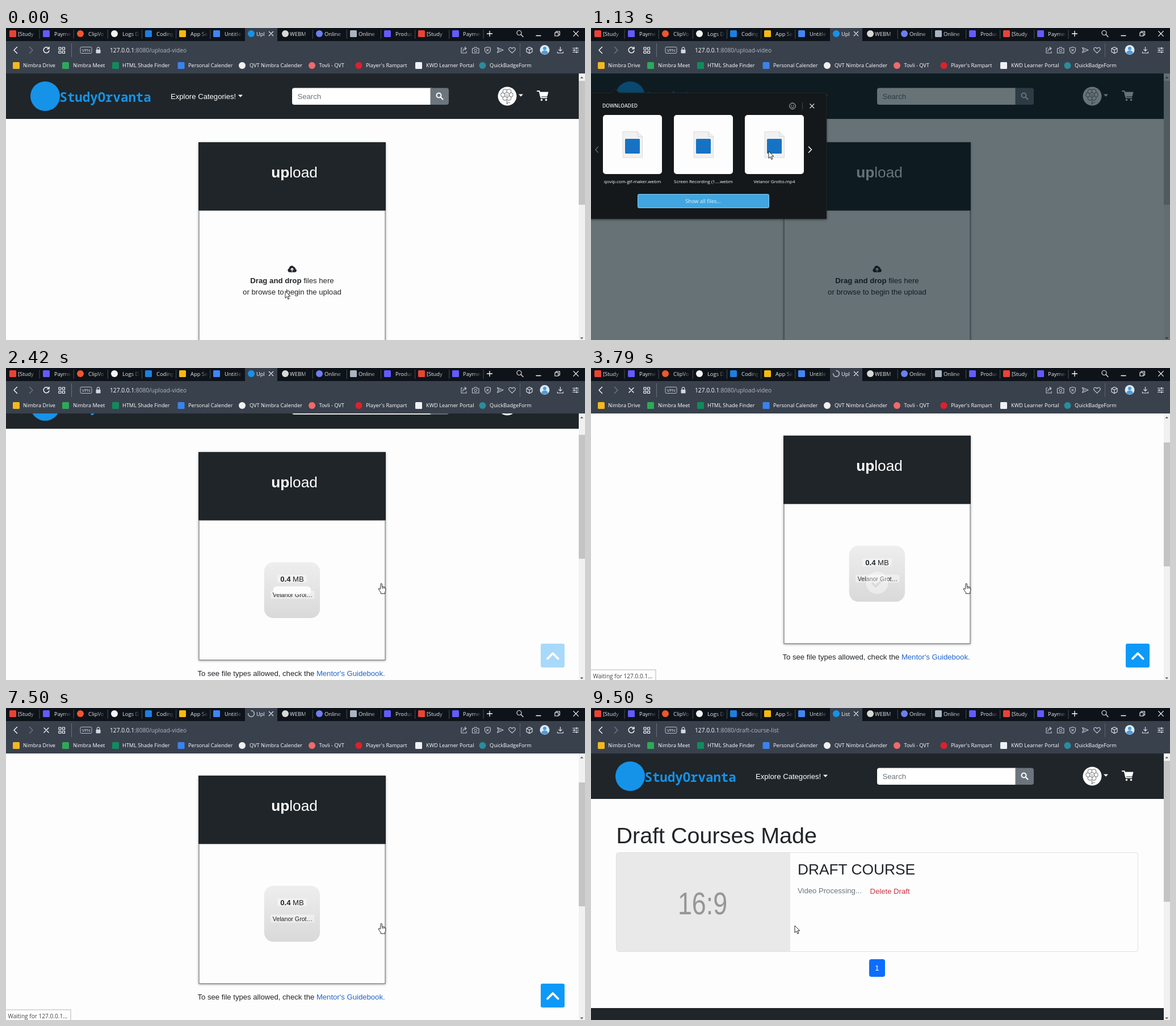
Recreate the animation shown at these times as an HTML page. Size 1020 by 549 pixels, loop 9540 ms.

```html
<!DOCTYPE html>
<html lang="en">
<head>
<meta charset="utf-8">
<title>Video upload</title>
<style>
html, body { margin: 0; width: 100%; height: 100%; overflow: hidden; background: #fdfdfd; }
svg { display: block; width: 100%; height: 100%; }
.ui { font-family: "Open Sans", "Noto Sans", sans-serif; }
.web { font-family: "Liberation Sans", Arial, sans-serif; }
.mono { font-family: "Noto Sans Mono", "DejaVu Sans Mono", monospace; }
text { white-space: pre; }
</style>
</head>
<body>
<svg id="stage" viewBox="0 0 1020 549" xmlns="http://www.w3.org/2000/svg"></svg>
<script>
const LOOP = 9540, SCROLL = 82;
const DARK = '#1f2529', BAR = '#39414d', STRIP = '#0d1319', INK = '#212529';

// Markup helpers
const rect = (x, y, w, h, fill, r = 0, more = '') =>
  `<rect x="${x}" y="${y}" width="${w}" height="${h}" rx="${r}" fill="${fill}" ${more}/>`;
const disc = (x, y, r, fill, more = '') => `<circle cx="${x}" cy="${y}" r="${r}" fill="${fill}" ${more}/>`;
const line = (d, color = '#fff', w = 1.2, more = '') =>
  `<path d="${d}" fill="none" stroke="${color}" stroke-width="${w}" stroke-linecap="round" stroke-linejoin="round" ${more}/>`;
const shape = (d, fill, more = '') => `<path d="${d}" fill="${fill}" ${more}/>`;
const text = (x, y, size, str, fill = '#fff', cls = 'ui', more = '') =>
  `<text x="${x}" y="${y}" font-size="${size}" fill="${fill}" class="${cls}" ${more}>${str}</text>`;
const group = (id, body, more = '') => `<g id="${id}" ${more}>${body}</g>`;
const mid = 'text-anchor="middle"', bold = 'font-weight="700"';
const mark = (kind, x, y, color) => kind === 'o' ? disc(x, y, 6, color) : rect(x - 6, y - 6, 12, 12, color, 1.5);
const cross = (x, y, r, color, w) => line(`M${x - r} ${y - r}l${2 * r} ${2 * r}m0 ${-2 * r}l${-2 * r} ${2 * r}`, color, w);

function tabs() {
  // icon x, text x, label, icon shape, icon colour
  const list = [
    [12, 21, '[Study', 's', '#ea4335'], [71, 85, 'Paymen', 's', '#635bff'],
    [131, 145, 'ClipVo', 'o', '#f0562d'], [191, 205, 'Logs Da', 'o', '#f4f4f4'],
    [251, 265, 'Coding', 's', '#1d7fe0'], [311, 325, 'App Se', 's', '#f6b912'],
    [371, 385, 'Untitle', 's', '#4285f4'], null,
    [492, 500, 'WEBM', 'o', '#d8d8d8'], [552, 561, 'Online', 'o', '#6c7ff0'],
    [612, 621, 'Online', 's', '#aab4c2'], [672, 686, 'Produc', 's', '#635bff'],
    [732, 741, '[Study', 's', '#ea4335'], [792, 805, 'Paymen', 's', '#635bff']
  ];
  let out = rect(0, 0, 1020, 23, STRIP);
  list.forEach((tab, i) => {
    const end = 58.5 + i * 60.15;
    if (tab) {
      const [ix, tx, label, kind, color] = tab;
      out += text(tx, 13.5, 9.4, label, '#eceef0') + mark(kind, ix, 10, color)
        + rect(end - 19, 0, 16, 23, 'url(#tabFade)') + rect(end - 4, 0, 10, 23, STRIP);
    }
    if (i !== 6 && i !== 7) out += rect(end, 3, 1, 16, '#4a4f55');
  });
  out += rect(421, 0, 57, 23, BAR)
    + group('favicon', disc(432, 10, 6, '#1593e8'))
    + group('spinner', line('M437.3 10A5.3 5.3 0 1 1 432 4.7', '#a4abb3', 1.8))
    + text(441, 13.5, 9.4, 'Upl', '#fff', 'ui', 'id="tabName"')
    + cross(467, 10, 3.6, '#fff', 1.2)
    + line('M847.5 10h9m-4.5-4.5v9', '#fff', 1.3)
    + disc(904, 8.5, 4, 'none', 'stroke="#e6e6e6" stroke-width="1.2"') + line('M907 11.5l4 4', '#e6e6e6', 1.3)
    + line('M934 13.5h8', '#fff', 1.3)
    + line('M967 8h6v6h-6zM969 8v-2h6.5v6.5h-2', '#fff', 1.1)
    + cross(1004, 10, 4.3, '#fff', 1.2);
  return out;
}

function toolbar() {
  const pale = '#c5cad1';
  let out = rect(0, 23, 1020, 57, BAR)
    + line('M19.5 33.5l-5.5 5.5 5.5 5.5', '#fff', 1.4)
    + line('M41.5 33.5l5.5 5.5-5.5 5.5', '#737b87', 1.3)
    + group('reload', line('M75.5 36.2A5 5 0 1 0 76 40M76 33.5v3.2h-3.4', '#fff', 1.4))
    + group('stop', cross(71, 39, 4, '#fff', 1.4));
  for (const x of [93, 99.5]) for (const y of [34, 40.5])
    out += rect(x, y, 4, 4, 'none', .6, 'stroke="#fff" stroke-width="1.2"');
  out += rect(115, 27, 1, 24, '#68707c')
    + rect(131, 33.5, 20, 11, 'none', 2, 'stroke="#b9bfc8"') + text(141, 41.8, 7.5, 'VPN', '#dfe3e8', 'ui', mid)
    + rect(158.5, 38, 8, 6.5, '#d5d9de', 1) + line('M160.2 38v-1.8a2.3 2.3 0 0 1 4.6 0v1.8', '#d5d9de', 1.2)
    + text(183, 42.7, 10.2, '127.0.0.1<tspan fill="#b3b9c2">:8080/<tspan id="path">upload-video</tspan></tspan>')
    + line('M804 35h-2v9h9v-3M805 41c0-4 2-5 5-5m-2-2.5l3 2.5-3 2.5', pale, 1.1)
    + line('M821.5 36h3l1-2h3.5l1 2h3v8h-11.5z', pale, 1.1) + disc(827.3, 39.7, 2.2, 'none', `stroke="${pale}"`)
    + line('M848.5 33.5l5 1.5v4q0 3.5-5 6-5-2.5-5-6v-4z', pale, 1.1) + cross(848.5, 39, 1.7, pale, 1.1)
    + line('M865.5 34.5l10.5 4.3-10.5 4.5 2-4.5zM867.5 38.8h3', pale, 1.1)
    + line('M891.5 44.2l-5-5q-2-3.5 1-4.7 2.5-.7 4 1.7 1.5-2.4 4-1.7 3 1.2 1 4.7z', pale, 1.2)
    + rect(905, 27, 1, 24, '#5d6571')
    + line('M922 33.5l5 2.5v6l-5 2.8-5-2.8v-6zM917 36l5 2.5 5-2.5M922 38.5v6', '#e2e5e9', 1.1)
    + disc(949, 38.5, 8.5, '#d9ecfb') + disc(949, 36, 3, '#4f9bd9') + shape('M943 44q1-4.5 6-4.5t6 4.5q-6 5-12 0z', '#4f9bd9')
    + line('M976.5 33.5v7m-2.8-2.6l2.8 2.8 2.8-2.8M971.5 42v2h10v-2', '#e2e5e9', 1.2)
    + line('M998.5 35.5h10m-10 3.5h10m-10 3.5h10', '#e2e5e9', 1.1)
    + line('M1005 34.5v2m-4 1.5v2m4 1.5v2', '#e2e5e9', 1.6);
  const marks = [
    [18, 30, 'Nimbra Drive', 's', '#f4b822'], [105, 118, 'Nimbra Meet', 's', '#2fa85a'],
    [193, 205, 'HTML Shade Finder', 's', '#128a5c'], [308.5, 321, 'Personal Calender', 's', '#3b82ec'],
    [416, 429, 'QVT Nimbra Calender', 'o', '#f1f1f1'], [539, 551.5, 'Tovli - QVT', 'o', '#f06a6a'],
    [621.5, 634, "Player's Rampart", 'o', '#e0202c'], [727, 740, 'KWD Learner Portal', 's', '#eef1f7'],
    [839.5, 852, 'QuickBadgeForm', 'o', '#2a8c9c']
  ];
  for (const [ix, tx, label, kind, color] of marks)
    out += mark(kind, ix, 66, color) + text(tx, 69.3, 9.2, label);
  return out;
}

function siteHeader() {
  let petals = '';
  for (let i = 0; i < 6; i++) {
    const a = i * Math.PI / 3;
    petals += disc(882.5 + 6.8 * Math.cos(a), 117.5 + 6.8 * Math.sin(a), 4, '#fff', 'stroke="#444" stroke-width=".8"');
  }
  return rect(0, 80, 1009, 80, DARK)
    + disc(69, 120, 26, '#1593e8')
    + text(94.5, 130, 22.4, 'StudyOrvanta', '#1593e8', 'mono', 'font-weight="600"')
    + text(290, 124.5, 13.13, 'Explore Categories!', '#fff', 'web') + shape('M409 117.5h8l-4 4.3z', '#fff')
    + rect(504, 105.5, 248, 29.5, '#fff', 4) + text(513.5, 125, 13.13, 'Search', '#6c757d', 'web')
    + shape('M747.5 105.5h28.5a4 4 0 0 1 4 4v21.5a4 4 0 0 1-4 4h-28.5z', '#6c757d')
    + disc(762.5, 118.5, 4, 'none', 'stroke="#fff" stroke-width="2"') + line('M765.8 121.8l3.7 3.7', '#fff', 2.2)
    + disc(883, 120, 16.5, '#fff') + petals
    + disc(882.5, 117.5, 4.3, '#fff', 'stroke="#444" stroke-width=".8"')
    + disc(881, 116.6, .6, '#333') + disc(884, 116.6, .6, '#333') + line('M880.8 118.8q1.7 1.7 3.4 0', '#444', .7)
    + line('M882.5 128v6m0-1q3-3 5-2', '#444', .8)
    + shape('M903 116.5h8l-4 4.3z', '#fff')
    + line('M936 111h3.5l3 11.5h10', '#fff', 1.9) + shape('M939.5 112.5h16l-2 8h-12.5z', '#fff')
    + disc(943.5, 126.5, 1.8, '#fff') + disc(951.5, 126.5, 1.8, '#fff');
}

function uploadPage() {
  const prompt = shape('M499.5 429.8a3.6 3.6 0 0 1-.6-7 4.6 4.6 0 0 1 8.7-2 3 3 0 0 1 2.4 3.2 3 3 0 0 1-1 5.8z', INK)
    + line('M504 428v-5m-2.2 2l2.2-2.2 2.2 2.2', '#fff', 1.4)
    + text(504, 448.5, 13.2, `<tspan ${bold}>Drag and drop</tspan> files here`, INK, 'web', mid)
    + text(504, 468.5, 13.2, 'or browse to begin the upload', INK, 'web', mid);
  const tile = rect(454.7, 394.8, 98.4, 98.4, 'url(#tile)', 16.4)
    + rect(478, 417, 52, 14, '#fff', 2, 'opacity=".4"') + rect(466, 445.5, 77.5, 14, '#fff', 2, 'opacity=".4"')
    + text(504, 429, 13.13, `<tspan ${bold}>0.4</tspan> MB`, INK, 'web', mid)
    + text(505, 456.6, 10.66, 'Velanor Grot…', INK, 'web', mid)
    + group('progress', rect(470.5, 437.5, 67, 13.5, '#fff', 6.7, 'opacity=".9"'))
    + group('check', disc(504, 444, 20.5, '#fff', 'fill-opacity=".8" stroke="#747474" stroke-opacity=".2"')
      + line('M496 445l5.5 5.5 11-11.5', '#d9d9d9', 4));
  return rect(339.5, 201, 329, 366, '#fdfdfd', 0, 'filter="url(#soft)"')
    + rect(340, 321, 328, 246, '#fdfdfd', 0, 'stroke="#6a6f72" stroke-width="1.1"')
    + rect(339, 201, 330, 120, DARK)
    + text(508, 263, 26.26, `<tspan ${bold}>up</tspan>load`, '#fff', 'web', mid)
    + group('prompt', prompt) + group('fileTile', tile)
    + text(337.5, 595, 13.13, 'To see file types allowed, check the <tspan fill="#1f66d0">Mentor\'s Guidebook.</tspan>', INK, 'web');
}

function draftPage() {
  return text(44.5, 238, 39.5, 'Draft Courses Made', INK, 'web')
    + rect(44.5, 254.5, 919, 174, '#fdfdfd', 4, 'stroke="#dedfe0"')
    + shape('M351 255v173h-302.5a3.5 3.5 0 0 1-3.5-3.5v-166a3.5 3.5 0 0 1 3.5-3.5z', '#e9e9e9')
    // condensed face
    + text(0, 0, 56, '16:9', '#969696', 'web', `${mid} transform="translate(196.5 363) scale(.8 1)"`)
    + text(364, 293, 26.3, 'DRAFT COURSE', INK, 'web')
    + text(364, 326, 13.13, 'Video Processing...', '#6c757d', 'web')
    + text(491.5, 327, 13.13, 'Delete Draft', '#cb3444', 'web')
    + rect(490, 442, 28, 31, '#0d6efd', 4) + text(504, 462, 13.13, '1', '#fff', 'web', mid)
    + rect(0, 528, 1009, 21, DARK);
}

function picker() {
  const files = ['qovip.com-gif-maker.webm', 'Screen Recording (1....webm', 'Velanor Grotto.mp4'];
  let out = shape('M-19 114h54l7-7.5 7 7.5h366v222h-434z', '#14181a', 'filter="url(#soft)" stroke="#2b3135" stroke-width=".7"')
    + text(20, 140.3, 8.6, 'DOWNLOADED', '#e6e8ea', 'ui', 'font-weight="600"')
    + disc(355, 137.3, 5.3, 'none', 'stroke="#ccd0d3"') + disc(353.2, 136, .8, '#ccd0d3') + disc(356.8, 136, .8, '#ccd0d3')
    + line('M352.3 138.5q2.7 3 5.4 0', '#ccd0d3', .9)
    + rect(372, 131, 1, 13, '#3f4549') + cross(389.3, 137.3, 3.6, '#fff', 1.1)
    + line('M12.5 209l-4.5 5 4.5 5', '#666b6f', 1.3) + line('M383.5 209l5 5-5 5', '#fff', 1.5)
    + rect(82.5, 292.5, 231, 24, '#41a6e0', 2, 'stroke="#8accef"')
    + text(197.5, 308, 9.2, 'Show all files...', '#e3f3fc', 'ui', mid);
  files.forEach((name, i) => {
    const x = 73 + 125 * i;
    out += rect(x - 52, 153, 104, 104, '#fdfdfd', 5)
      + shape(`M${x - 17} 182.5h26l8.5 8.5v37h-34.5z`, '#f1f1f1', 'stroke="#d5d5d5" stroke-width=".8"')
      + line(`M${x + 9} 182.5v8.5h8.5`, '#d0d0d0', .8)
      + rect(x - 13, 195, 26, 26, '#1673c4', 1.5)
      + text(x, 272.6, 7.9, name, '#fff', 'ui', `${mid} font-weight="500"`);
  });
  return out + group('tick', rect(360.5, 157, 11.5, 11.5, '#6d7478', 1.5) + line('M363 162.7l2.5 2.6 4.5-5', '#fff', 1.3));
}

function scrollbar() {
  return rect(1009, 80, 11, 469, '#f1f1f1') + rect(1009, 93, 11, 218, '#c4c4c4', 0, 'id="thumb"')
    + shape('M1011.5 88.5l2.8-3 2.8 3z', '#555') + shape('M1011.5 544.5l2.8 3 2.8-3z', '#555');
}

const arrow = shape('M0 0v12.3l2.9-2.7 2 4.7 2-.9-2-4.5h4z', '#fff', 'stroke="#111" stroke-width=".9"');
const hand = shape('M-1.3 0q1.3-.8 2.2.3v5q4.4-.3 6.1 1.9 1.3 4.8-.8 7.7v2.6h-7.4v-2.3q-2.8-3-4.3-6.2 1.6-1.7 3.2.8z', '#fff', 'stroke="#111" stroke-width=".9"')
  + line('M1 5.5v3.2m2.2-2.7v2.7m2.2-2.2v2.2', '#111', .7);

document.getElementById('stage').innerHTML = `<defs>
  <linearGradient id="tabFade"><stop offset="0" stop-color="${STRIP}" stop-opacity="0"/><stop offset="1" stop-color="${STRIP}"/></linearGradient>
  <linearGradient id="tile" x2="0" y2="1"><stop stop-color="#eee"/><stop offset="1" stop-color="#d9d9d9"/></linearGradient>
  <filter id="soft" x="-10%" y="-10%" width="120%" height="120%" color-interpolation-filters="sRGB"><feDropShadow dx="0" dy="1" stdDeviation="2" flood-opacity=".4"/></filter>
  <clipPath id="view"><rect y="80" width="1020" height="469"/></clipPath></defs>`
  + rect(0, 0, 1020, 549, '#fdfdfd')
  + `<g clip-path="url(#view)">`
  + group('page', siteHeader() + group('upload', uploadPage()) + group('drafts', draftPage()))
  + group('toTop', rect(942, 485, 42, 42, '#0d99f8', 3) + line('M954 511.5l9.3-9.5 9.3 9.5', '#fff', 3.8))
  + scrollbar()
  + group('status', rect(-1, 531, 115, 20, '#fdfdfd', 0, 'stroke="#b5b5b5"') + text(3.5, 545.5, 10.1, 'Waiting for 127.0.0.1...', '#444'))
  + rect(0, 80, 1020, 469, '#04161f', 0, 'id="dim"')
  + group('picker', picker()) + '</g>'
  + tabs() + toolbar() + group('arrow', arrow) + group('hand', hand);

const el = {};
document.querySelectorAll('#stage [id]').forEach(n => el[n.id] = n);
const show = (id, on) => el[id].setAttribute('display', on ? 'inline' : 'none');
const fade = (id, v) => { show(id, v > 0); el[id].setAttribute('opacity', v); };
const move = (id, value) => el[id].setAttribute('transform', value);
const write = (id, str) => { if (el[id].textContent !== str) el[id].textContent = str; };

const ramp = (t, a, b) => Math.min(1, Math.max(0, (t - a) / (b - a)));
const smooth = u => u * u * (3 - 2 * u);

// cubic-bezier(.77, 0, .175, 1)
function swing(x) {
  let lo = 0, hi = 1;
  for (let i = 0; i < 20; i++) {
    const u = (lo + hi) / 2, v = 1 - u;
    if (3 * v * v * u * .77 + 3 * v * u * u * .175 + u ** 3 < x) lo = u; else hi = u;
  }
  return smooth(lo);
}

const OPEN = 450, PICK = 1250, ADDED = 1600, WHEEL = 2300, DONE = 3355, LEAVE = 8300;
const stops = [[0, 492, 463], [600, 492, 463], [1050, 313, 217], [1300, 313, 217],
  [1640, 661.5, 379.5], [8500, 661.5, 379.5], [9100, 359, 383], [LOOP, 359, 383]];

function pointer(t) {
  const i = stops.findIndex(s => s[0] > t);
  const [a, x0, y0] = stops[i - 1], [b, x1, y1] = stops[i];
  const u = smooth(ramp(t, a, b));
  return `translate(${x0 + (x1 - x0) * u} ${y0 + (y1 - y0) * u})`;
}

function draw(t) {
  const left = t >= LEAVE, waiting = t >= DONE + 50 && !left;
  const scroll = left ? 0 : SCROLL * smooth(ramp(t, WHEEL, WHEEL + 200));

  move('page', `translate(0 ${-scroll})`);
  show('upload', !left);
  show('drafts', left);
  el.thumb.setAttribute('y', 93 + scroll * 38 / SCROLL);
  el.thumb.setAttribute('height', left ? 248 : 218);
  fade('toTop', left ? 0 : ramp(t, WHEEL + 50, WHEEL + 250));

  show('prompt', t < ADDED);
  show('fileTile', t >= ADDED);
  fade('progress', 1 - ramp(t, DONE, DONE + 400));
  const rise = swing(ramp(t, DONE, DONE + 900)), exit = swing(ramp(t, DONE + 2100, DONE + 3000));
  fade('check', rise - exit);
  move('check', `translate(0 ${33 * (1 - rise - exit)})`);

  const opening = ramp(t, OPEN, OPEN + 150), closing = ramp(t, ADDED, ADDED + 205);
  const scale = 1 - .055 * (1 - opening + closing);
  fade('picker', opening - closing);
  move('picker', `translate(198 225) scale(${scale}) translate(-198 -225)`);
  fade('dim', .6 * (opening - ramp(t, ADDED - 40, ADDED + 80)));
  show('tick', t >= PICK);

  show('status', waiting);
  show('reload', !waiting);
  show('stop', waiting);
  show('favicon', !waiting);
  show('spinner', waiting);
  move('spinner', `rotate(${(t - 3790) * 360 / 927 - 90} 432 10)`);
  write('tabName', left ? 'List' : 'Upl');
  write('path', left ? 'draft-course-list' : 'upload-video');

  const isHand = t >= ADDED && !left;
  show('hand', isHand);
  show('arrow', !isHand);
  move(isHand ? 'hand' : 'arrow', pointer(t));
}

let start;
function tick(now) {
  start ??= now;
  draw((now - start) % LOOP);
  requestAnimationFrame(tick);
}
draw(0);
requestAnimationFrame(tick);
</script>
</body>
</html>
```
